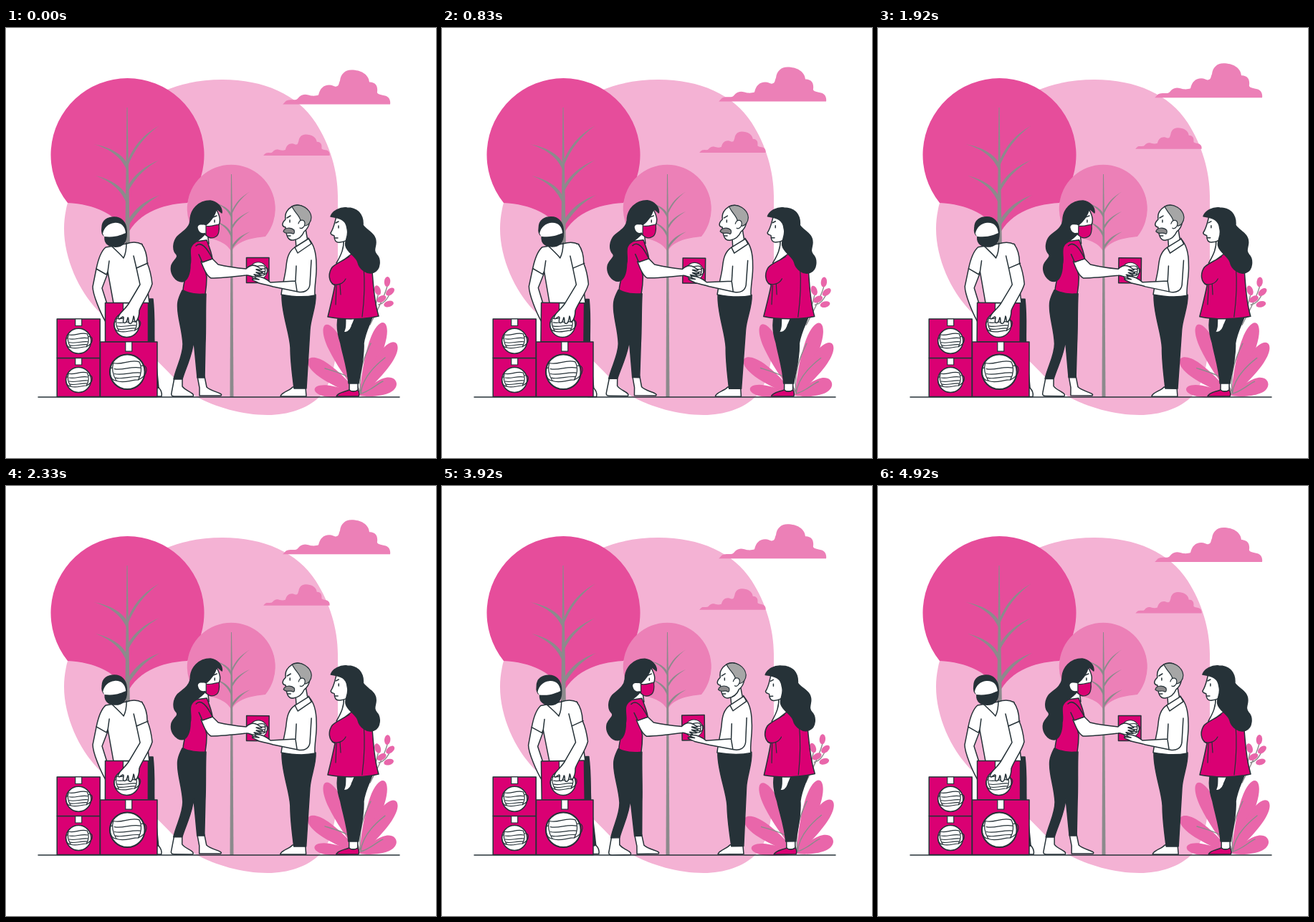
An HTML page that plays this animation: 600 by 600 pixels, repeating every 5010 ms.

```html
<!DOCTYPE html>
<html lang="en">
<head>
<meta charset="utf-8">
<title>Sharing mask boxes</title>
<style>
  html, body { margin: 0; width: 100%; height: 100%; overflow: hidden; background: #fff; }
  svg { display: block; width: 100vw; height: 100vh; }
  .pale { fill: #f4b2d4; }
  .mid { fill: #ec80b7; }
  .deep { fill: #e64d9b; }
  .leaf { fill: #e966aa; }
  .hot { fill: #da0073; }
  .dark { fill: #263238; }
  .white { fill: #fff; }
  .grey { fill: #8c8a8c; }
  .ash { fill: #a6a6a6; }
  .ink { stroke: #263238; stroke-width: 1.5; stroke-linejoin: round; stroke-linecap: round; }
  .line { fill: none; }
  .thin { stroke-width: 1.2; }
  .mask path { vector-effect: non-scaling-stroke; }
  .vein { fill: none; stroke: #8c8a8c; stroke-width: 1.4; stroke-linecap: round; }
</style>
</head>
<body>
<svg viewBox="0 0 600 600">
  <defs>
    <path id="cloud" d="M0 0C3-2 4-6 9-6C14-7 18-5 21-8C25-13 29-15 36-13C42-11 47-12 50-13C52-22 57-27 65-27C70-27 72-24 75-25C79-26 78-29 80-33C81-42 87-48 96-48C109-48 120-42 121-31C129-31 133-26 132-18C131-14 136-14 143-12C148-11 151-6 150 0Z"/>
    <g id="branches" class="grey">
      <path d="M169 199C161 181 147 169 122 162C148 167 163 177 169 189Z"/>
      <path d="M169 247C162 227 147 214 125 206C149 212 164 223 169 236Z"/>
      <path d="M169 187C178 165 190 150 214 136C193 151 179 169 169 195Z"/>
      <path d="M169 222C179 204 193 193 214 184C195 195 181 207 169 231Z"/>
      <path d="M169 270C181 250 194 241 215 233C197 243 183 255 169 279Z"/>
    </g>
    <g id="mask" class="mask">
      <circle r="17.5" class="white"/>
      <g class="ink thin line">
        <path d="M-14-9C-6-6 2-13 12-10C15-4 14 3 11 8C4 8-4 12-11 9C-14 4-16-3-14-9Z" class="white"/>
        <path d="M-13-3C-5-1 4-6 13-4M-13 2C-5 4 4 0 13 1M-12 6C-5 8 4 4 12 5"/>
        <path d="M-15-4C-20-5-18 9-11 9M14-6C21-8 22 3 11 8"/>
      </g>
    </g>
  </defs>

  <path class="pale" d="M302 72C360 72 407 93 432 132C452 163 463 200 463 235V400C463 455 458 495 437 515C420 531 394 540 365 540C330 540 292 529 265 514C245 502 229 481 207 461C182 440 151 417 128 394C102 367 81 322 81 280C81 235 105 195 140 150C177 102 232 72 302 72Z"/>

  <path class="deep" d="M86 244A107 107 0 1 1 253 244C215 246 183 260 169 289C156 260 124 246 86 244Z"/>
  <path class="grey" d="M168.500 111H169.500L171 200L173 310H166L167.500 200Z"/>
  <use href="#branches"/>

  <path class="mid" d="M266.500 291A61.500 61.500 0 1 1 362 291C340 293 322 298 314.500 312C307 298 289 293 266.500 291Z"/>
  <path class="grey" d="M314 204H315L316 270L317.500 515H312.500L313.500 270Z"/>
  <use href="#branches" transform="translate(217 150.200) scale(.575)"/>

  <g class="mid" id="clouds">
    <use href="#cloud" x="386" y="106.500"/>
    <use href="#cloud" transform="translate(359 178) scale(.617)"/>
  </g>

  <g data-pivot="484 431">
    <g id="leaves"></g>
    <path class="vein" d="M495 510C487 486 469 482 445 475M495 510C491 480 500 458 509 440M495 510C497 490 511 474 529 460M495 510C508 507 518 496 526 493"/>
    <path class="vein" d="M508 414C518 394 528 376 532 360M514 391C517 383 518 378 519 373M520 386C528 384 531 379 535 372"/>
    <g class="leaf" id="buds"></g>
  </g>

  <path class="ink line" d="M45 515H549"/>

  <!-- packer -->
  <g data-pivot="169 390" class="ink">
    <path class="white" d="M207 502L211 500C216 504 218 509 217 514H205Z"/>
    <path class="dark" d="M152 378H205C208 405 206 425 207 440L213 502L204 504L190 438H152Z"/>
    <path class="white" d="M126 336L121 361C121 372 132 398 139 410L145 400L140 382L134 363L142 342Z"/>
    <path class="white" d="M139 306C131 313 128 326 126 336L140 344L142 340L150 384H200L190 302C183 298 174 299 168 301Z"/>
    <path class="line" d="M142 340L144 325M146 303C153 310 159 315 164 321C167 315 168 307 168 300"/>
    <path class="dark" d="M134 279C134 268 142 264 151 264C161 264 167 271 168 281C169 292 168 303 156 305C145 306 137 302 138 291C135 289 133 285 134 279Z"/>
    <path class="white" stroke="none" d="M135 287C137 278 143 273 151 272C160 271 166 276 167 286C162 288 153 293 137 291Z"/>
    <rect class="hot" x="138.500" y="383.500" width="60" height="54.500"/>
    <rect class="white thin" x="163.500" y="384" width="8" height="10"/>
    <use href="#mask" x="168.500" y="414"/>
    <path class="white" d="M189 301C195 309 197 319 197 328C201 337 203 348 204 357C200 371 190 383 186 394C186 400 184 407 181 410C178 410 180 404 178 402C177 408 176 414 172 412C170 411 172 405 170 404C169 409 167 413 164 411C162 409 166 403 163 403L158 406C155 406 157 402 159 399C163 394 167 391 171 385L187 358L182 335L178 318"/>
    <path class="line" d="M182 335L198 328"/>
  </g>

  <g id="stack"></g>

  <!-- queue -->
  <g data-pivot="484 383" class="ink">
    <path class="white" d="M479 495H491V507H479Z"/>
    <path class="hot" d="M461 514C464 508 472 508 479 505C482 508 487 508 491 505C493 508 493 512 492 514Z"/>
    <path class="dark" d="M464 401H512C507 415 501 425 499 440C500 462 494 480 492 496H478C477 476 470 456 467 440C462 425 461 412 464 401Z"/>
    <path class="white" d="M474 403L487 402C487 409 483 412 482 417C480 423 475 426 471 424C475 419 473 412 474 403Z"/>
    <path class="white" d="M471 294C472 307 468 316 461 328L475 338L489 314L481 296Z"/>
    <path class="hot" d="M485 313C495 314 506 316 509 325C513 345 511 372 520 402C498 407 469 407 449 403C453 387 456 374 459 359C450 355 449 343 455 334C460 329 467 326 472 323Z"/>
    <path class="line thin" d="M472 323L479 319M455 357C464 360 471 356 474 350M461 359L460 386M466 357L467 372M499 333C501 355 500 379 497 403"/>
    <path class="white" d="M461 263C458 273 458 278 453 286C453 289 457 289 458 290C458 296 460 300 466 299C476 298 481 293 482 284L480 263Z"/>
    <path class="dark" d="M453 263C456 255 466 250 476 251C491 251 499 261 498 275C504 284 516 286 516 299C516 306 512 310 517 316C523 322 523 337 513 341C504 345 493 336 491 327C489 319 476 313 474 304C472 296 479 290 476 280C475 268 467 265 453 263Z"/>
    <path class="line" d="M464 276V279M460 272L464 270M459 293L463 293"/>
  </g>

  <!-- receiver -->
  <g data-pivot="390 381" class="ink">
    <path class="white" d="M383 514C384 508 395 507 400 501H418L419 514Z"/>
    <path class="dark" d="M385 372H432C433 388 425 405 424 421L419 503H402C400 486 397 466 397 446C396 425 384 397 385 372Z"/>
    <path class="white" d="M404 294L405 307L422 303L418 280H405Z"/>
    <path class="white" d="M403 306L422 294C431 303 433 316 433 330C434 346 430 359 431 373C417 376 400 375 384 372C386 356 390 344 391 332C392 322 394 312 403 306Z"/>
    <path class="line" d="M403 306L407 314L426 301L422 293"/>
    <path class="white" d="M399 249C391 254 389 261 390 267C384 273 385 277 390 278C391 291 394 297 401 296C408 295 413 291 416 284C424 278 427 264 420 254C414 247 406 245 399 249Z"/>
    <path class="ash thin" d="M399 249C412 243 425 253 426 264C426 270 422 276 416 276C417 271 414 268 411 269C410 262 403 258 399 249Z"/>
    <path class="white thin" d="M408 273C410 266 417 267 417 273C417 277 413 281 410 279"/>
    <path class="grey thin" d="M387 284C388 279 397 277 402 282C403 285 402 288 400 287C396 284 391 289 387 284Z"/>
    <path class="line" d="M396 268V271M392 265L397 262M393 290L397 290"/>
  </g>

  <!-- giver -->
  <g data-pivot="300 378" class="ink">
    <path class="white" d="M235 488L231 509C230 513 232 514 235 514H261C264 509 251 507 246 500V488Z"/>
    <path class="white" d="M267 486L270 502V513H300C304 509 287 508 280 501L277 486Z"/>
    <path class="dark" d="M246 366L279 371C278 394 279 418 278 440L277 488H267L262 436C260 457 251 473 246 490H234C238 472 247 458 247 441C246 418 237 398 240 382C241 376 244 370 246 366Z"/>
    <path class="white" d="M269 282L266 304L283 301L281 285Z"/>
    <path class="hot" d="M265 298L280 296C284 306 287 315 288 322L276 329L280 347C280 356 279 365 278 371C268 372 256 371 247 366C248 350 256 335 255 319C254 310 258 302 265 298Z"/>
    <path class="white" d="M272 262L294 254C298 262 300 268 297 275L293 287C288 293 279 292 276 285Z"/>
    <path class="dark" d="M257 269C257 253 269 241 285 241C294 242 302 250 301 258L294 252C291 263 285 270 279 275C275 272 268 276 270 282L278 287C274 292 270 295 264 299C252 306 260 319 257 330C257 343 253 353 246 354C237 354 228 343 231 331C234 323 241 321 238 316C231 309 234 297 239 291C245 285 256 280 257 269Z"/>
    <path class="white" stroke="none" d="M278 276C272 273 266 275 268 280C269 285 274 288 279 285Z"/>
    <path class="hot thin" d="M279 276C285 278 291 275 297 274C298 281 297 289 293 291C287 295 282 292 279 289Z"/>
    <path class="line" d="M291 268V271M289 264L294 262"/>
    <rect class="hot" x="335.500" y="320.500" width="31.500" height="35"/>
    <use href="#mask" transform="translate(352 339) scale(.7)"/>
    <path class="white" d="M288 322L296 330C309 333 324 335 335 336C340 331 346 330 351 333L357 337C356 339 351 336 349 337L358 341C357 344 351 340 349 341L356 345C354 347 348 343 346 344L350 347C345 349 339 344 335 345C318 347 301 349 286 349C280 346 276 336 272 326Z"/>
    <path class="hot" d="M265 304C272 297 280 306 288 322L274 327L269 316"/>
  </g>

  <g data-pivot="390 381" class="ink">
    <path class="white" d="M405 317C405 331 403 344 406 353L369 355C363 350 356 346 348 347C345 348 350 350 353 351L344 350C342 352 350 354 353 356C360 358 367 359 373 361L407 368C416 370 423 366 424 358L427 322" stroke="none"/>
    <path class="line" d="M405 332L404 353L369 355C363 350 356 346 348 347C345 348 350 350 353 351L344 350C342 352 350 354 353 356C360 358 367 359 373 361L407 368C416 370 423 366 424 358L426 324M404 354L406 367"/>
  </g>
</svg>
<script>
const $ = id => document.getElementById(id);
const LOOP = 5010, STEP = 250 / 3, FRAMES = 60;

const box = (x, y, w, h, s) => `<g class="ink">
  <rect class="hot" x="${x}" y="${y}" width="${w}" height="${h}"/>
  <rect class="white thin" x="${x + w / 2 - 4.5}" y="${y}" width="9" height="${9.5 * s}"/>
  <use href="#mask" transform="translate(${x + w / 2 - 5 * (s - 1)} ${y + h / 2 + 3.5}) scale(${s})"/></g>`;

$('stack').innerHTML = box(71.2, 460.5, 60, 54, 1) +
  box(71.2, 406, 60, 54.5, 1) + box(131.5, 438, 79.5, 76.5, 1.39);

// angle, length, half width
const leaves = [[-26, 110, 11], [18, 107, 11], [34, 89, 11], [69, 54, 11], [-55, 88, 11], [-82, 64, 8]];
$('leaves').innerHTML = leaves.map(([a, l, w]) =>
  `<path class="leaf" transform="translate(494 513) rotate(${a})"
    d="M0 0C${-w * .6} ${-l * .2} ${-w} ${-l * .5} ${-w} ${-l * .7}C${-w} ${-l * 1.1} ${w} ${-l * 1.1} ${w} ${-l * .7}C${w} ${-l * .5} ${w * .6} ${-l * .2} 0 0Z"/>`).join('');

// x, y, tilt
const buds = [[532, 354, 5], [518.5, 366, -20], [536, 368, 50], [524, 378, 60], [534, 385, 75]];
$('buds').innerHTML = buds.map(([x, y, a]) =>
  `<ellipse rx="4.2" ry="7" transform="translate(${x} ${y}) rotate(${a})"/>`).join('');

const swayers = document.querySelectorAll('[data-pivot]');

// triangle wave: 0, 1 at a quarter, -1 at three quarters
const sway = p => p < .25 ? 4 * p : p < .75 ? 2 - 4 * p : 4 * p - 4;
const lift = p => 24 * Math.min(p, 1 - p);

function draw(now) {
  const t = now % LOOP;
  const p = Math.min(FRAMES - 1, Math.floor((t + 4) / STEP)) / FRAMES;
  $('clouds').setAttribute('transform', `translate(0 ${-lift(p)})`);
  for (const g of swayers) g.setAttribute('transform', `rotate(${sway(p)} ${g.dataset.pivot})`);
}

const start = performance.now();
function tick() {
  draw(performance.now() - start);
  requestAnimationFrame(tick);
}
tick();
</script>
</body>
</html>
```
